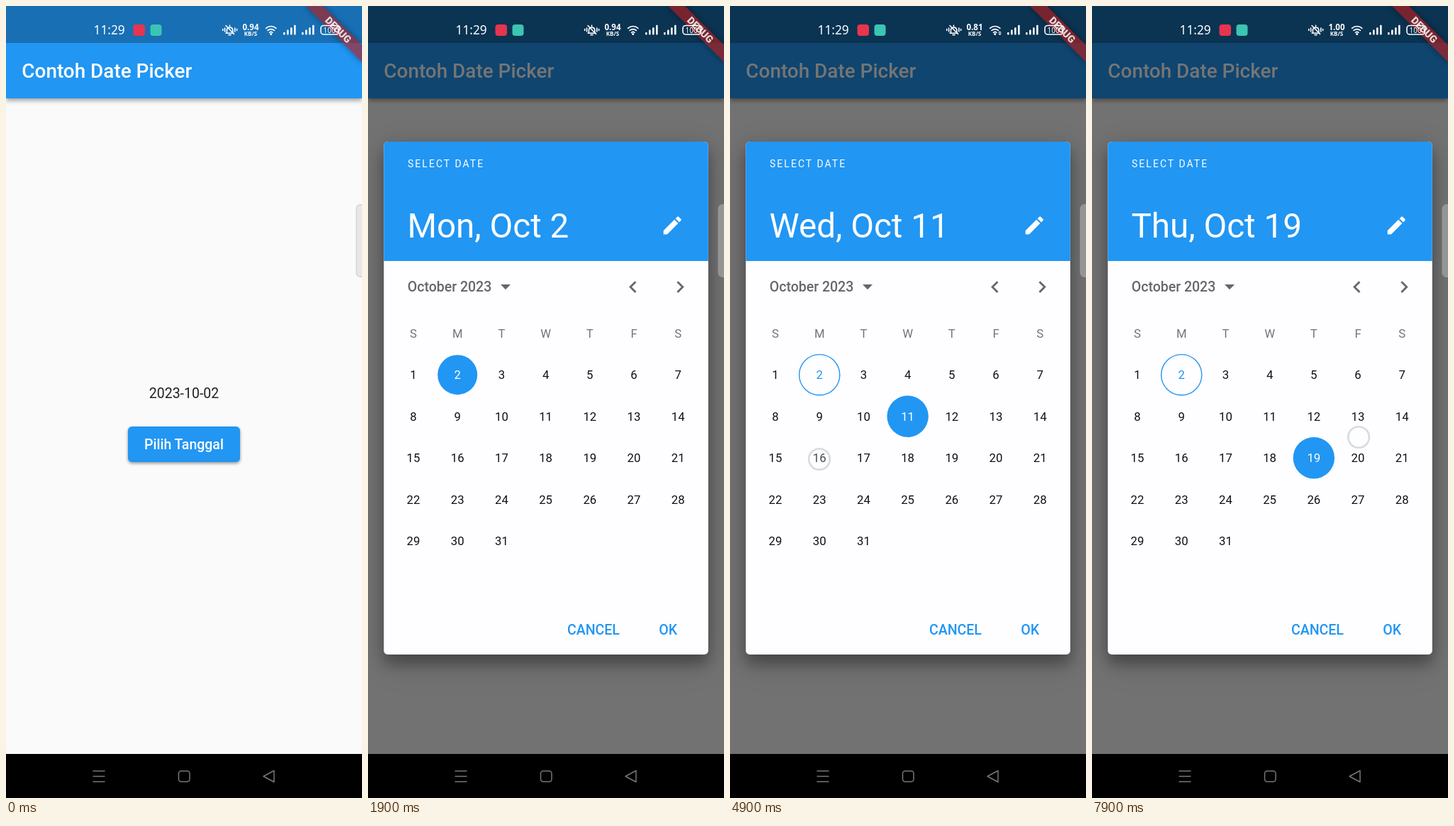
An HTML page that plays this animation: 502x1115 px, repeating every 8 s.

```html
<!DOCTYPE html>
<html lang="id">
<head>
<meta charset="utf-8">
<title>Date picker</title>
<style>
  html, body { margin: 0; width: 100%; height: 100%; overflow: hidden; background: #000; }
  svg { display: block; width: 100%; height: 100%; }
  text { font-family: Roboto, sans-serif; font-size: 19.5px; }
  .medium { font-weight: 500; }
  .mid { text-anchor: middle; }
  .small { font-size: 16.7px; text-anchor: middle; }
  .status text { font-family: "Noto Sans", sans-serif; fill: #fff; }
  .line { fill: none; stroke: #fff; stroke-width: 1.6; stroke-linecap: round; }
</style>
</head>
<body>
<svg viewBox="0 0 502 1115">
  <!-- page -->
  <rect width="502" height="1115" fill="#fafafa"/>
  <rect width="502" height="130" fill="#2196f3" style="filter:drop-shadow(0 3px 3px rgba(0,0,0,.38))"/>
  <rect width="502" height="52" fill="#000" opacity=".26"/>
  <text class="medium" x="22.3" y="101" fill="#fff" style="font-size:27.9px">Contoh Date Picker</text>
  <text class="mid" x="251" y="551.5" fill="#212121">2023-10-02</text>
  <rect x="172" y="592" width="158" height="50" rx="5.6" fill="#2196f3" style="filter:drop-shadow(0 2px 2px rgba(0,0,0,.4))"/>
  <text class="medium mid" x="251" y="624" fill="#fff">Pilih Tanggal</text>

  <g id="dialog">
    <rect width="502" height="1053" fill="#000" opacity=".54"/>
    <rect x="22.3" y="191" width="457.5" height="722" rx="5.6" fill="#fefdff"
      style="filter:drop-shadow(0 14px 9px rgba(0,0,0,.22)) drop-shadow(0 8px 16px rgba(0,0,0,.25))"/>
    <path d="M22.3 359V196.6a5.6 5.6 0 0 1 5.6-5.6H474.2a5.6 5.6 0 0 1 5.6 5.6V359z" fill="#2196f3"/>
    <text x="56" y="227" fill="#fff" style="font-size:13.9px;letter-spacing:2.09px">SELECT DATE</text>
    <text id="heading" x="55.4" y="326" fill="#fff" style="font-size:47.6px"></text>
    <path transform="translate(412.5 292.2) scale(1.394)" fill="#fff"
      d="M3 17.25V21h3.75L17.81 9.94l-3.75-3.75zM20.71 7.04a1 1 0 0 0 0-1.41l-2.34-2.34a1 1 0 0 0-1.41 0l-1.83 1.83 3.75 3.75z"/>
    <g fill="#68666a">
      <text class="medium" x="55.8" y="402">October 2023</text>
      <path d="M187 392h14l-7 7.2z"/>
      <path transform="translate(356.9 378.8) scale(1.394)" d="M15.41 7.41L14 6l-6 6 6 6 1.41-1.41L10.83 12z"/>
      <path transform="translate(423.4 378.8) scale(1.394)" d="M10 6L8.59 7.41 13.17 12l-4.58 4.59L10 18l6-6z"/>
    </g>
    <circle id="today" fill="none" stroke="#2196f3" stroke-width="1.4" r="28.6"/>
    <circle id="picked" fill="#2196f3"/>
    <g id="days"></g>
    <g class="medium" fill="#2196f3">
      <text x="281" y="884.5">CANCEL</text>
      <text x="410.3" y="884.5">OK</text>
    </g>
  </g>

  <!-- corner ribbon -->
  <g transform="translate(502 0) rotate(45)">
    <rect x="-56" y="39" width="112" height="16.8" fill="#b71c1c" opacity=".63" style="filter:drop-shadow(0 0 4px rgba(0,0,0,.6))"/>
    <text class="mid" y="52.4" fill="#fff" opacity=".82" style="font-size:14.2px;font-weight:900">DEBUG</text>
  </g>

  <!-- system status -->
  <g class="status">
    <text x="123.5" y="40" style="font-size:17.3px;font-weight:500">11:29</text>
    <rect x="179.5" y="26" width="16.5" height="16" rx="4" fill="#e8344e"/>
    <rect x="203.5" y="26" width="16" height="16" rx="4" fill="#3cc5b2"/>
    <path class="line" d="M310 38.2h11M311.4 38v-4.5a4.3 4.3 0 0 1 8.4 0V38M315.5 28.6v-1.4M314 40.6h3M310 27.5l11.5 12M308.6 31v5M322.8 31v5M305.7 32.5v2M325.6 32.5v2"/>
    <text id="speed" class="mid" x="345" y="33.6" style="font-size:11.5px;font-weight:600"></text>
    <text class="mid" x="345" y="41.5" style="font-size:8px;font-weight:700">KB/S</text>
    <path class="line" stroke-width="2" d="M366.5 31.3a10.8 10.8 0 0 1 14.4 0M369 34.4a7 7 0 0 1 9.4 0M371.5 37.3a3.4 3.4 0 0 1 4.4 0"/>
    <circle cx="373.7" cy="39.6" r="1.5" fill="#fff"/>
    <path id="traffic" d="M378 37.6h5l-2.5-2.2zM378 38.8h5l-2.5 2.2z" fill="#fff"/>
    <g id="bars" fill="#fff"></g>
    <rect class="line" x="444" y="27.5" width="25.5" height="12.5" rx="4"/>
    <text x="447.5" y="37.6" style="font-size:10px;font-weight:500">100</text>
  </g>

  <rect x="494" y="279.5" width="14" height="102" rx="6" fill="#cacaca" fill-opacity=".42" stroke="#aaa" stroke-opacity=".6"/>

  <rect y="1053" width="502" height="62" fill="#000"/>
  <g fill="none" stroke="#777" stroke-width="1.5" stroke-linejoin="round">
    <path d="M122.5 1077h17M122.5 1084.5h17M122.5 1092h17M363 1084.5l15-8v16z"/>
    <rect x="243.5" y="1077" width="15.5" height="15" rx="3.5"/>
  </g>

  <circle id="touch" r="14.8" fill="#fff" fill-opacity=".24" stroke="#6b8195" stroke-opacity=".27" stroke-width="2.6"/>
</svg>
<script>
const LOOP = 8000, OPEN = 1900, TODAY = 2;
const names = ['Sun', 'Mon', 'Tue', 'Wed', 'Thu', 'Fri', 'Sat'];
// [time, value]
const picks = [[0, 2], [2700, 18], [3400, 27], [4000, 11], [5000, 16], [5900, 19]];
const speeds = [[0, '0.94'], [3600, '0.81'], [7400, '1.00']];
// [start, end, x, y]
const touches = [
  [1100, 1400, 217, 628], [2600, 2800, 250, 638], [3200, 3400, 365, 667],
  [3900, 4200, 248, 571], [4900, 5100, 126, 638], [5800, 6000, 313, 638],
  [7900, LOOP, 376, 607]
];

const el = id => document.getElementById(id);
const set = (node, attrs) => { for (const k in attrs) node.setAttribute(k, attrs[k]); };
const show = (node, on) => { node.style.display = on ? '' : 'none'; };
const valueAt = (list, t) => list.filter(([at]) => at <= t).pop()[1];
const colX = i => 64 + 62.2 * i;
const dayPos = d => [colX((d - 1) % 7), 519.2 + 58.5 * Math.floor((d - 1) / 7)];
const label = (x, y, s, fill) => `<text class="small" x="${x}" y="${y + 6}" fill="${fill}">${s}</text>`;

let grid = names.map((n, i) => label(colX(i), 461, n[0], '#757377')).join('');
for (let d = 1; d <= 31; d++) grid += label(...dayPos(d), d, '#111');
el('days').innerHTML = grid;
const dayNodes = [...el('days').children].slice(7);

let bars = '';
for (const x of [391, 417])
  for (let i = 0; i < 4; i++)
    bars += `<rect x="${x + i * 5}" y="${37 - i * 3.4}" width="2.6" height="${3.5 + i * 3.4}" rx="1"/>`;
el('bars').innerHTML = bars;

const [todayX, todayY] = dayPos(TODAY);
set(el('today'), { cx: todayX, cy: todayY });

function draw(t) {
  const day = valueAt(picks, t);
  const [cx, cy] = dayPos(day);
  show(el('dialog'), t >= OPEN);
  el('heading').textContent = `${names[(day - 1) % 7]}, Oct ${day}`;
  set(el('picked'), { cx, cy, r: day === TODAY ? 28 : 29.2 });
  show(el('today'), day !== TODAY);
  dayNodes.forEach((n, i) =>
    set(n, { fill: i + 1 === day ? '#fff' : i + 1 === TODAY ? '#2196f3' : '#111' }));
  el('speed').textContent = valueAt(speeds, t);
  show(el('traffic'), t >= 2700 && t < 7000);

  const tap = touches.find(([from, to]) => t >= from && t < to);
  show(el('touch'), tap);
  if (tap) set(el('touch'), { cx: tap[2], cy: tap[3] });
}

const start = performance.now();
function tick() {
  draw((performance.now() - start) % LOOP);
  requestAnimationFrame(tick);
}
tick();
</script>
</body>
</html>
```
